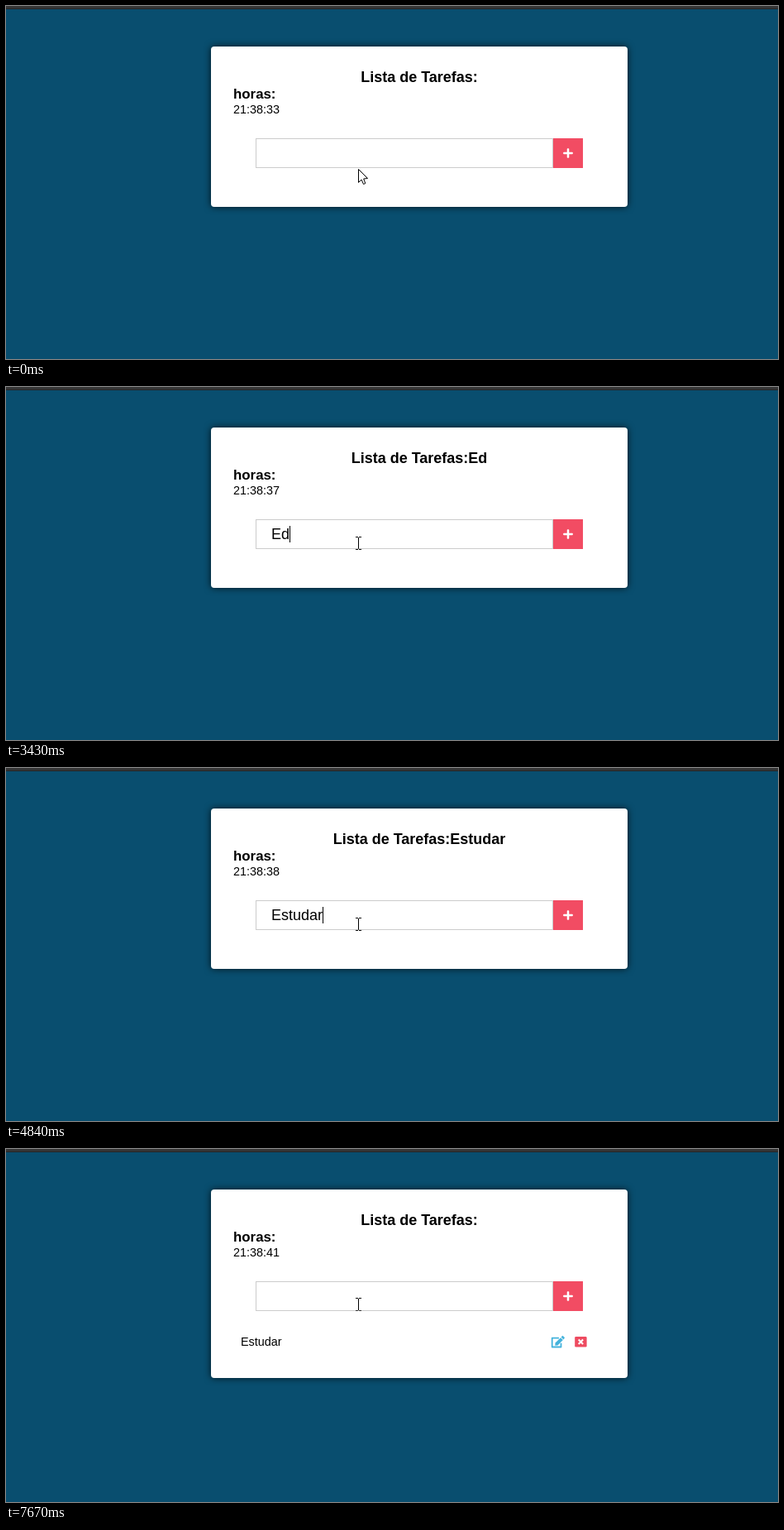
These frames come from a looping animation (934 by 427 pixels, 8000 ms). An HTML page with a canvas:

```html
<!DOCTYPE html>
<html lang="pt">
<head>
<meta charset="utf-8">
<title>Lista de Tarefas</title>
<style>
  html, body { margin: 0; width: 100%; height: 100%; overflow: hidden; background: #094e6f; }
  canvas { display: block; }
</style>
</head>
<body>
<canvas id="stage" width="934" height="427"></canvas>
<script>
const ctx = document.getElementById('stage').getContext('2d');
const LOOP = 8000;
const FONT = '"Liberation Sans", Arial, sans-serif';
const BLUE = '#094e6f', RED = '#f24c63', EDIT = '#45b3dc';

const BLINK = 530;
const PRESS = 150;
const CLICKS = [440, 7520];
const ADDED = 6670;

// A slow start with one correction ('<' deletes), then a steady rhythm.
const KEYS = 'Ed<studar';
const SLOW = [2880, 3430, 4050, 4120];
const keyTime = i => SLOW[i] ?? 4370 + (i - SLOW.length) * 117;

function typedAt(t) {
  if (t >= ADDED) return '';
  return [...KEYS].filter((key, i) => keyTime(i) <= t)
    .reduce((word, key) => key === '<' ? word.slice(0, -1) : word + key, '');
}

// The caret blinks from the moment of the latest focus or key.
function caretAt(t) {
  const resets = [CLICKS[0], ...[...KEYS].map((key, i) => keyTime(i))].filter(start => start <= t);
  return resets.length > 0 && Math.floor((t - Math.max(...resets)) / BLINK) % 2 === 0;
}

const secondsAt = t => 34 + Math.floor((t - 345) / 1003);

function pointerAt(t) {
  if (t < 70) return [426, 197];
  if (t < 280) return [421, 187];
  return [423, t < 6170 ? 181 : 180];
}

function rect(color, x, y, w, h) {
  ctx.fillStyle = color;
  ctx.fillRect(x, y, w, h);
}

function box(color, x, y, w, h, r) {
  ctx.fillStyle = color;
  ctx.beginPath();
  ctx.roundRect(x, y, w, h, r);
  ctx.fill();
}

function text(str, x, y, size, weight = 'normal', align = 'left') {
  ctx.font = `${weight} ${size}px ${FONT}`;
  ctx.textAlign = align;
  ctx.fillStyle = '#000';
  ctx.fillText(str, x, y);
}

function path(...points) {
  ctx.beginPath();
  points.forEach(([x, y]) => ctx.lineTo(x, y));
}

// Runs a drawing with its own origin and scale.
function place(x, y, scale, paint) {
  ctx.save();
  ctx.translate(x, y);
  ctx.scale(scale, scale);
  paint();
  ctx.restore();
}

function drawCard(height) {
  ctx.save();
  ctx.shadowColor = 'rgba(0,0,0,.75)';
  ctx.shadowBlur = 8;
  box('#fff', 248, 49, 504, height, 4);
  ctx.restore();
}

function drawForm(value, showCaret) {
  rect('#ccc', 302, 160, 360, 36);
  rect('#fff', 303, 161, 358, 34);
  rect(RED, 662, 160, 36, 36);
  box('#fff', 674.2, 176.75, 11.6, 2.5, 0.8);
  box('#fff', 678.75, 172.2, 2.5, 11.6, 0.8);
  text(value, 321, 184, 18);
  if (showCaret) rect('#000', 321 + Math.round(ctx.measureText(value).width), 168, 1, 20);
}

function editIcon() {
  ctx.fillStyle = ctx.strokeStyle = EDIT;
  ctx.lineWidth = 64;
  ctx.lineJoin = 'round';
  path([325, 96], [32, 96], [32, 480], [416, 480], [416, 315]);
  ctx.stroke();
  path([396, 76], [500, 180], [274, 406], [159, 417], [170, 302]);
  ctx.fill();
  path([418, 54], [488, -8], [576, 80], [522, 158]);
  ctx.fill();
}

function deleteIcon() {
  box('#ee4b60', 0, 32, 512, 448, 48);
  ctx.strokeStyle = '#fff';
  ctx.lineWidth = 75;
  for (const slope of [-1, 1]) {
    path([160, 256 - slope * 96], [352, 256 + slope * 96]);
    ctx.stroke();
  }
}

function drawTask() {
  const scale = 14.4 / 512;
  text('Estudar', 284, 238, 14.4);
  place(659.8, 226, scale, editIcon);
  place(688.2, 226, scale, deleteIcon);
}

function arrow() {
  ctx.fillStyle = '#fff';
  ctx.strokeStyle = '#000';
  ctx.lineWidth = 1;
  path([0.5, 0.5], [0.5, 16.5], [4, 13], [6.5, 18.5], [8.8, 17.6], [6.7, 12], [11.5, 11.5]);
  ctx.closePath();
  ctx.fill();
  ctx.stroke();
}

// The text pointer inverts whatever lies under it.
function beam() {
  ctx.globalCompositeOperation = 'difference';
  for (const y of [0, 15]) {
    rect('#fff', 0, y, 3, 1);
    rect('#fff', 4, y, 3, 1);
  }
  rect('#fff', 3, 1, 1, 14);
}

function drawPointer(t) {
  const [x, y] = pointerAt(t);
  if (CLICKS.some(start => t >= start && t < start + PRESS)) {
    box('rgba(255,255,0,.47)', x - 11, y - 5, 24, 24, 12);
  }
  place(x, y, 1, t < 70 ? arrow : beam);
}

function draw(t) {
  const value = typedAt(t);
  const added = t >= ADDED;
  rect(BLUE, 0, 0, 934, 427);
  rect('#353535', 0, 0, 934, 3);
  rect('#252729', 0, 3, 934, 1);
  drawCard(added ? 228 : 194);
  text('Lista de Tarefas:' + value, 500, 92, 18, 'bold', 'center');
  text('horas:', 275, 112, 16.85, 'bold');
  text('21:38:' + secondsAt(t), 275, 130, 14.4);
  drawForm(value, caretAt(t));
  if (added) drawTask();
  drawPointer(t);
}

const begin = performance.now();
function frame() {
  draw((performance.now() - begin) % LOOP);
  requestAnimationFrame(frame);
}
frame();
</script>
</body>
</html>
```
